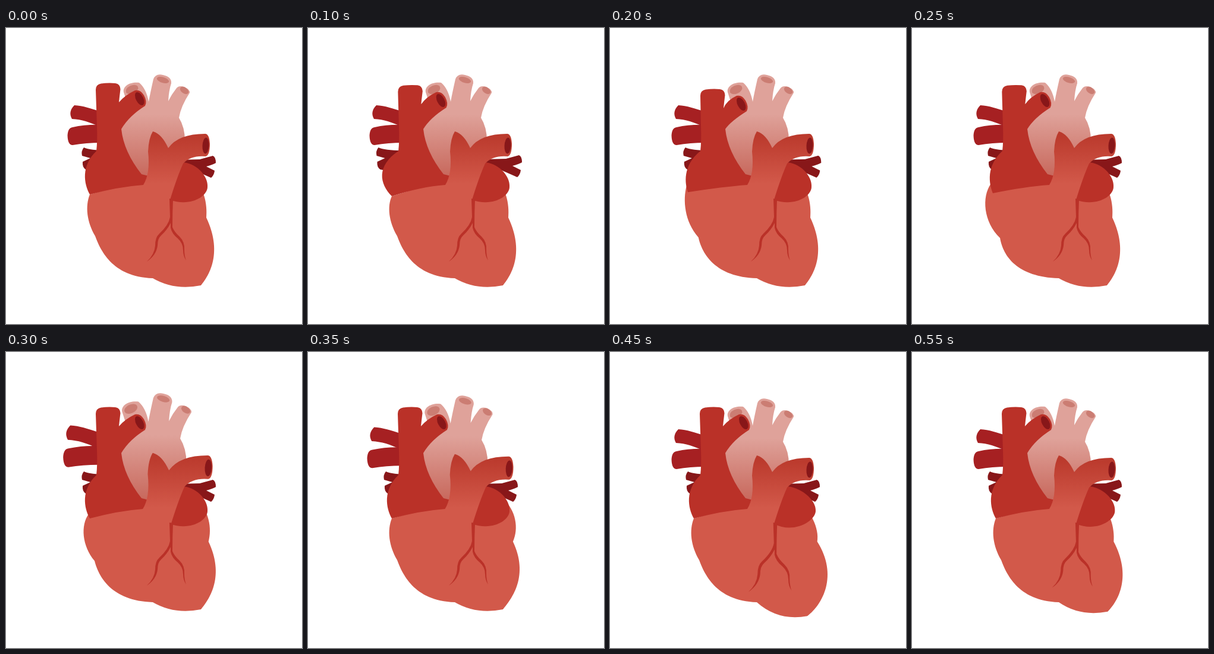
An HTML page with a canvas for the animation above (0.6 s loop, 498 px wide and 498 px high).

```html
<!DOCTYPE html>
<html lang="en">
<head>
<meta charset="utf-8">
<title>Beating heart</title>
<style>
  html, body { margin: 0; width: 100%; height: 100%; overflow: hidden; background: #fff; }
  canvas { display: block; }
</style>
</head>
<body>
<canvas id="stage" width="498" height="498"></canvas>
<script>
const ctx = document.getElementById('stage').getContext('2d');
const STEP = 50, LOOP = 600;
const RED = '#ba3128', DARK = '#a62022', DEEP = '#881719', FLESH = '#d2594a', PINK_HOLE = '#cb7d73';

// Rises linearly from 0 to 1 at `peak`, then falls back to 0 (all in ms).
function pulse(t, peak, rise, fall) {
  return Math.max(0, 1 - (t < peak ? (peak - t) / rise : (t - peak) / fall));
}

// The contraction travels from the veins down to the apex.
function poseAt(t) {
  const atrium = pulse(t, 100, 100, 175);
  const corner = pulse(t, 200, 100, 100);
  return {
    veins: pulse(t, 100, 100, 150),
    atriumL: 11 * atrium,
    cavaDrop: 10 * pulse(t, 200, 150, 75),
    cornerX: 141 - 10 * corner,
    cornerY: 280 - 5 * corner + 3 * atrium,
    bulgeL: 16 * pulse(t, 250, 150, 100),
    arteries: pulse(t, 300, 50, 110),
    shoulder: pulse(t, 350, 100, 130),
    waist: 14 * pulse(t, 425, 170, 150),
    atriumR: 7 * pulse(t, 450, 100, 150),
    apex: 15 * pulse(t, 400, 50, 200)
  };
}

function gradient(y0, c0, y1, c1) {
  const g = ctx.createLinearGradient(0, y0, 0, y1);
  g.addColorStop(0, c0);
  g.addColorStop(1, c1);
  return g;
}
const pink = gradient(145, '#dfa29a', 248, '#c8695d');
const trunkRed = gradient(182, '#bb3a2d', 262, FLESH);

function shape(color, d) {
  ctx.fillStyle = color;
  ctx.fill(new Path2D(d));
}

function hole(color, x, y, rx, ry, degrees) {
  ctx.fillStyle = color;
  ctx.beginPath();
  ctx.ellipse(x, y, rx, ry, degrees * Math.PI / 180, 0, 7);
  ctx.fill();
}

function moved(dx, dy, draw) {
  ctx.save();
  ctx.translate(dx, dy);
  draw();
  ctx.restore();
}

function scaled(x, y, s, draw) {
  ctx.save();
  ctx.translate(x, y);
  ctx.scale(s, s);
  ctx.translate(-x, -y);
  draw();
  ctx.restore();
}

function drawSmallVeins(a) {
  moved(-12.5 * a, 0, () => shape(DEEP,
    'M131 201Q142 206 170 206V245L134 238Q128 234 129 225L142 219L128 215Q126 207 131 201Z'));
  moved(7 * a, -a, () => shape(DEEP,
    'M285 222L326 221L348 215Q353 217 353 227Q348 230 337 233L351 240Q350 248 345 252Q325 243 290 228Z'));
}

function drawLeftVessels() {
  shape(DARK, 'M115 130C130 131 142 135 160 141V167C140 158 128 154 111 153Q104 141 115 130Z');
  shape(DARK, 'M112 167Q135 162 160 163V193Q135 193 112 197Q104 197 103.5 181Q104 168 112 167Z');
}

function drawAorta() {
  shape(pink, 'M198 108C196 97 210 90 224 92Q236 102 240 124Q243 108 248 86Q252 76 264 79' +
    'Q279 82 278 93Q274 105 273 123Q279 111 287 101Q291 96 300 99Q310 104 309 109' +
    'Q294 132 291 151Q301 167 301 190L270 210L245 250L225 248L198 215L185 170L205 130Z');
  hole(PINK_HOLE, 212, 103.5, 11, 7, -25);
  hole(PINK_HOLE, 264, 87.5, 10.5, 4.8, 17);
  hole(PINK_HOLE, 300, 105, 8, 5, 35);
}

function drawVentricles(p) {
  const { cornerX: x, cornerY: y, bulgeL: b, apex: w, shoulder: s } = p;
  const k = 337 + p.waist;
  shape(FLESH, `M${x - .2 * b} ${y - b}C${133 - b} ${300 - b} ${136 - b} 326 ${150 - .12 * b} ${350 + .2 * b}
    C${158 - .3 * b} ${371 + .8 * b} 177 419 247 421
    Q283 ${442 + w} ${328 + .35 * w} ${433 + w}
    C${344 + 1.2 * w} ${414 + w} ${364 + .8 * w + p.waist} 376 ${k} 319
    C${k + 2 + 8 * s} 297 ${334 + 16 * s} 266 ${310 + 18 * s} 247L290 240L231 255Z`);
}

function drawRightAtrium(p) {
  const { cornerX: x, cornerY: y, atriumL: a, cavaDrop: h } = p;
  const at = (px, py) => `${px - .4 * h} ${py + .9 * h}`;
  const top = (px, py) => `${px + .1 * h} ${py + h}`;
  shape(RED, `M${x} ${y}C${131 - a} 262 ${126 - a} 232 152 207Q154 190 153 165
    L${top(151, 104)}Q${top(151, 95)} ${top(160, 93.5)}Q${top(172, 92)} ${top(184, 93)}
    Q${top(192, 94)} ${top(192.5, 103)}Q${top(191, 115)} ${top(190, 125)}
    Q${at(200, 113)} ${at(217, 105)}Q${at(226, 103)} ${at(232, 113)}Q${at(238, 124)} ${at(234, 131)}
    Q${at(207, 148)} 194 170Q198 208 228 246L240 249L233 264L231 264Q190 267 ${x} ${y}Z`);
  moved(-.4 * h, .9 * h, () => hole(DEEP, 224.8, 119, 6.2, 12, -27));
}

function drawLeftAtrium(u) {
  shape(RED, `M296 226C318 226 ${341 + u} 248 ${339 + u} 268
    C${338 + u} 285 308 ${301 + u * .8} 276 289L285 240Z`);
}

function drawTrunk() {
  shape(trunkRed, 'M231 264Q243 245 239 208Q240 185 247 174Q262 178 273 202Q290 178 335 178' +
    'Q342 178 343 195Q343 214 336 216Q311 214 298 228Q288 250 276 289L265 300L235 285Z');
  hole(DEEP, 336, 198, 5.5, 13.5, 3);
}

function drawCoronary() {
  shape(RED, 'M275 287L281 288Q280 310 280 335Q283 343 292 351Q301 360 300 373Q300 383 303 391' +
    'Q298 384 298 374Q298 362 289 354Q279 346 277 336L277 328Q271 340 261 349Q255 354 255 366' +
    'Q253 382 237 393Q250 381 251 366Q251 352 258 346Q274 331 276 318Z');
}

function render() {
  const t = performance.now() % LOOP;
  const p = poseAt(t - t % STEP);
  const swell = 1 + .05 * p.arteries;

  ctx.clearRect(0, 0, 498, 498);
  drawSmallVeins(p.veins);
  scaled(250, 260, swell, () => { drawLeftVessels(); drawAorta(); });
  drawVentricles(p);
  drawRightAtrium(p);
  drawLeftAtrium(p.atriumR);
  scaled(250, 260, swell, drawTrunk);
  scaled(278, 287, 1 + .009 * p.apex, drawCoronary);
  requestAnimationFrame(render);
}
render();
</script>
</body>
</html>
```
